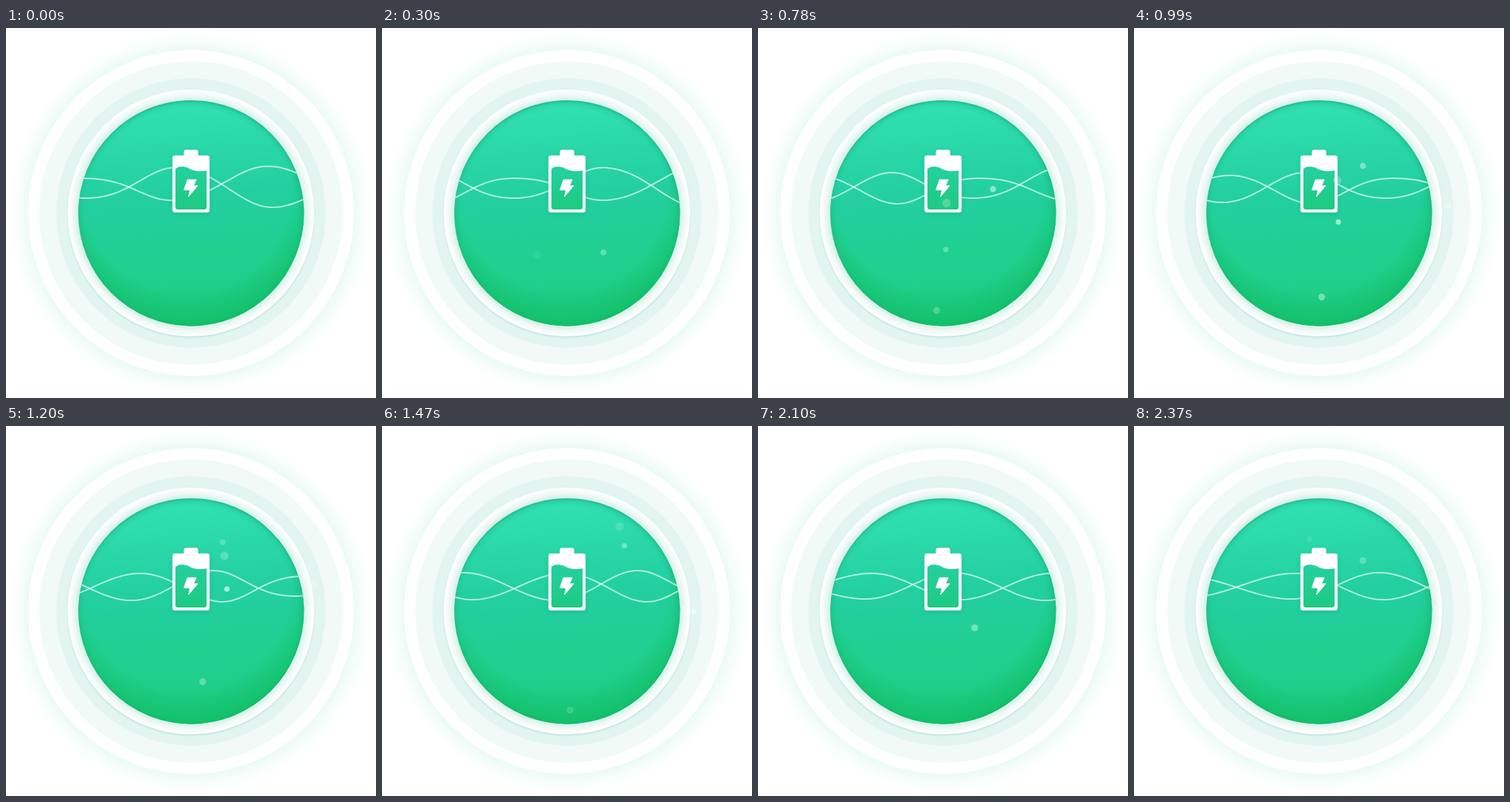
These frames come from a looping animation (522x522 px, 2.4 s). An HTML page:

```html
<!DOCTYPE html>
<html lang="en">
<head>
<meta charset="utf-8">
<title>Charging</title>
<style>
  html, body { margin: 0; width: 100%; height: 100%; overflow: hidden; background: #fff; }
  svg { display: block; width: 100vw; height: 100vh; }
</style>
</head>
<body>
<svg viewBox="0 0 522 522">
  <defs>
    <radialGradient id="glow" gradientUnits="userSpaceOnUse" cx="261" cy="261" r="262">
      <stop offset=".87" stop-color="#e9faf4"/>
      <stop offset=".92" stop-color="#f5fdfa"/>
      <stop offset=".96" stop-color="#fcfffe"/>
      <stop offset="1" stop-color="#fff"/>
    </radialGradient>
    <radialGradient id="rim" gradientUnits="userSpaceOnUse" cx="261" cy="261" r="174">
      <stop offset=".91" stop-color="#cfeee4"/>
      <stop offset=".945" stop-color="#e9f7f3"/>
      <stop offset=".985" stop-color="#fbfefd"/>
      <stop offset="1" stop-color="#fff"/>
    </radialGradient>
    <linearGradient id="green" gradientUnits="userSpaceOnUse" x1="250" y1="102" x2="272" y2="420">
      <stop offset="0" stop-color="#32e1b2"/>
      <stop offset=".2" stop-color="#2ad8a9"/>
      <stop offset=".42" stop-color="#23cfa0"/>
      <stop offset=".72" stop-color="#20d08f"/>
      <stop offset="1" stop-color="#1dcb82"/>
    </linearGradient>
    <radialGradient id="shade" gradientUnits="userSpaceOnUse" cx="255" cy="225" r="200">
      <stop offset=".74" stop-color="#12c068" stop-opacity="0"/>
      <stop offset=".97" stop-color="#12c068" stop-opacity=".95"/>
    </radialGradient>
    <radialGradient id="inset" gradientUnits="userSpaceOnUse" cx="261" cy="264" r="162">
      <stop offset=".93" stop-color="#0a9a70" stop-opacity="0"/>
      <stop offset=".97" stop-color="#0a9a70" stop-opacity=".12"/>
      <stop offset="1" stop-color="#0a8a66" stop-opacity=".45"/>
    </radialGradient>
    <linearGradient id="fluid" x1="0" y1="0" x2="0" y2="1">
      <stop offset="0" stop-color="#25cfa2"/>
      <stop offset="1" stop-color="#1dcb80"/>
    </linearGradient>
    <filter id="soft" x="-30%" y="-30%" width="160%" height="160%">
      <feGaussianBlur stdDeviation="3"/>
    </filter>
    <filter id="edge"><feGaussianBlur stdDeviation=".8"/></filter>
    <circle id="disc" cx="261.2" cy="261.2" r="159.2"/>
    <clipPath id="inside"><use href="#disc"/></clipPath>
    <path id="shell" d="M254 172H268Q271 172 271 175V180H284Q287 180 287 183V257Q287 260 284 260H238Q235 260 235 257V183Q235 180 238 180H251V175Q251 172 254 172Z"/>
  </defs>

  <circle cx="261" cy="261" r="262" fill="url(#glow)"/>
  <circle cx="261" cy="261" r="230" fill="#fff"/>
  <circle cx="261" cy="261" r="214" fill="#f1faf7"/>
  <circle cx="261" cy="261" r="190" fill="#e2f5f0"/>
  <circle cx="261" cy="262.5" r="174" fill="#bce3d9" filter="url(#edge)"/>
  <circle cx="261" cy="261" r="174" fill="url(#rim)"/>
  <use href="#disc" fill="url(#green)"/>
  <use href="#disc" fill="url(#shade)"/>
  <use href="#disc" fill="url(#inset)"/>

  <g id="waves" clip-path="url(#inside)" fill="none" stroke="#fff" stroke-opacity=".65" stroke-width="2"></g>
  <g id="back" fill="#fff"></g>

  <use href="#shell" y="2" fill="#0d9a6c" opacity=".4" filter="url(#soft)"/>
  <use href="#shell" fill="#fff"/>
  <use href="#shell" fill="none" stroke="#d5f3e8" stroke-opacity=".7"/>
  <path fill="url(#fluid)" d="M239 199C243 194.500 251 194.500 257 197.500C264 201.500 272 203.500 283 201V253Q283 256 280 256H242Q239 256 239 253Z"/>
  <path fill="#fff" stroke="#fff" stroke-linejoin="round" d="M256 214H268.500L264.500 222.500H270.500L257.500 238L259.500 228.500H251Z"/>
  <g id="front" fill="#fff"></g>
</svg>

<script>
const LOOP = 2400, DRIFT = 606;
const $ = id => document.getElementById(id);
const mix = (a, b, k) => a + (b - a) * k;

function add(parent, tag, attrs) {
  const el = document.createElementNS('http://www.w3.org/2000/svg', tag);
  set(el, attrs);
  return parent.appendChild(el);
}
function set(el, attrs) {
  for (const name in attrs) el.setAttribute(name, attrs[name]);
}

// Lobes of the twin wave: x, middle, half height. Strands cross between them.
const lobes = [
  [-535, 227, 16], [-374, 226, 18], [-250, 226, 19], [-120, 227, 19], [-4, 226, 22],
  [110, 226, 14], [235, 220, 23], [372, 224, 29], [530, 224, 24]
];

function strand(dir) {
  const points = [];
  for (let i = 0; i < lobes.length - 1; i++) {
    const [x0, mid0, half0] = lobes[i], [x1, mid1, half1] = lobes[i + 1];
    const sign = i % 2 ? -dir : dir;
    for (let s = 0; s < 1; s += 1 / 32) {
      const wave = Math.cos(Math.PI * s), ease = (1 - wave) / 2;
      const y = mix(mid0, mid1, ease) + sign * mix(half0, half1, ease) * wave;
      points.push(mix(x0, x1, s).toFixed(2) + ',' + y.toFixed(2));
    }
  }
  return { dir, el: add($('waves'), 'g', {}), points: points.join(' ') };
}
const strands = [1, -1].map(strand);
strands.forEach(s => s.line = add(s.el, 'polyline', { points: s.points }));

// Each bubble travels from x, y by dx, dy; bend eases the rise, sway bows the path.
const bubbles = [
  [30, 1370, 4.3, 285, 402, 0, -266, .7, 47],
  [150, 1650, 6, 203, 343, 165, -251],
  [620, 1060, 3.8, 247, 335, 118, -216, 1.2],
  [600, 840, 4.8, 241, 415, 51, -76],
  [1290, 1380, 4.8, 254, 407, 88, -354, 2],
  [1640, 780, 4.2, 285, 304, -40, -154],
  [620, 760, 5, 461, 298, -36, -96],
  [1020, 1040, 4.2, 462, 314, 16, -121, 1, -30]
].map(([start, life, r, x, y, dx, dy, bend = 1, sway = 0]) => {
  const el = add($(dx < 0 ? 'back' : 'front'), 'circle', { r });
  return t => {
    const p = Math.min(1, Math.max(0, (t - start) / life));
    const arc = Math.sin(Math.PI * p);
    set(el, {
      cx: x + dx * p + sway * arc,
      cy: y + dy * p ** bend,
      opacity: 9 / (r * r) * arc
    });
  };
});

function draw() {
  const t = performance.now() % LOOP, p = t / LOOP;
  // The strands slip a little against each other while drifting.
  const slip = 19 * Math.sin(.8 * Math.PI * p) - 6;
  strands.forEach(s => set(s.el, { transform: `translate(${DRIFT * p + s.dir * slip / 2} 0)` }));
  bubbles.forEach(move => move(t));
  requestAnimationFrame(draw);
}
draw();
</script>
</body>
</html>
```
